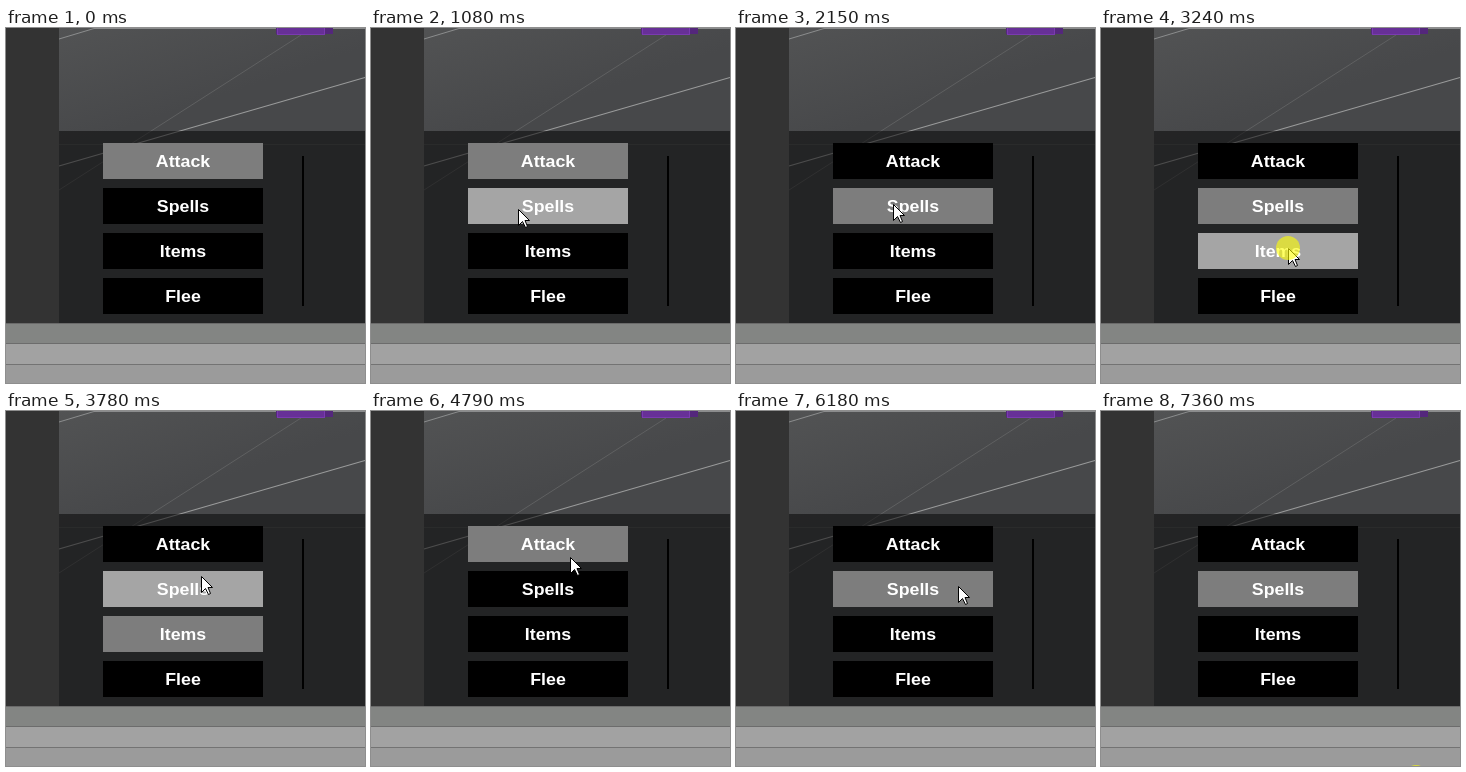
These frames come from a looping animation (359x355 px, 7430 ms). An HTML page with a canvas:

```html
<!DOCTYPE html>
<html lang="en">
<head>
<meta charset="utf-8">
<title>Battle menu</title>
<style>
  html, body { margin: 0; width: 100%; height: 100%; overflow: hidden; background: #333; }
  canvas { display: block; }
</style>
</head>
<body>
<canvas id="stage" width="359" height="355"></canvas>
<script>
const ctx = document.getElementById('stage').getContext('2d');
const LOOP = 7430;
const STEP = 73; // the pointer is sampled at this interval
const LABELS = ['Attack', 'Spells', 'Items', 'Flee'];
const BTN = { x: 97, y: 115, w: 160, h: 36, pitch: 45 };
const UI_ASPECT = 1.11; // the game view is wider than its layout
const PARKED = { x: 339, y: 460 };

// Each move eases from the previous place to x, y
const MOVES = [
  { at: 860, steps: 4, x: 147, y: 181 },
  { at: 1160, steps: 3, x: 146, y: 157 },
  { at: 1690, steps: 3, x: 157, y: 176 },
  { at: 2470, steps: 7, x: 187, y: 220 },
  { at: 3550, steps: 4, x: 195, y: 165 },
  { at: 3850, steps: 3, x: 199, y: 142 },
  { at: 4710, steps: 2, x: 199, y: 146 },
  { at: 5570, steps: 6, x: 222, y: 175 },
  { at: 6490, steps: 1, x: 238, y: 258 },
  { at: 6580, steps: 1, ...PARKED },
  { at: 7360, steps: 1, x: 315, y: 366 }
];

const PRESSES = [
  { from: 2000, to: 2150 },
  { from: 3240, to: 3320 },
  { from: 4320, to: 4390 },
  { from: 5260, to: 5400 },
  { from: 6100, to: 6180 },
  { from: 7360, to: LOOP }
];

const easeOut = u => u * (2 - u);
const buttonTop = i => BTN.y + i * BTN.pitch;

function pointerAt(t) {
  let pos = PARKED;
  for (const { at, steps, x, y } of MOVES) {
    if (t < at) break;
    const done = Math.min(Math.floor((t - at) / STEP) + 1, steps);
    const k = easeOut(done / steps);
    pos = {
      x: Math.round(pos.x + (x - pos.x) * k),
      y: Math.round(pos.y + (y - pos.y) * k)
    };
  }
  return pos;
}

function buttonUnder({ x, y }) {
  if (x < BTN.x || x >= BTN.x + BTN.w) return -1;
  return LABELS.findIndex((_, i) => y >= buttonTop(i) && y < buttonTop(i) + BTN.h);
}

// A button becomes selected when the press on it is released
function selectedAt(t) {
  const last = PRESSES.filter(p => p.to <= t).pop();
  return last ? buttonUnder(pointerAt(last.to)) : 0;
}

function rect(x, y, w, h, color) {
  ctx.fillStyle = color;
  ctx.fillRect(x, y, w, h);
}

function line(color, width, ...pts) {
  ctx.strokeStyle = color;
  ctx.lineWidth = width;
  ctx.beginPath();
  pts.forEach(([x, y]) => ctx.lineTo(x, y));
  ctx.stroke();
}

function drawScene() {
  const floor = ctx.createLinearGradient(53, 0, 90, 110);
  floor.addColorStop(0, '#525354');
  floor.addColorStop(1, '#47484a');
  rect(53, 0, 306, 295, floor);
  line('#8b8c8d', 1, [53, 11], [88, 0.5], [359, 0.5]);
  line('#5f6061', 1, [295, 7], [53, 162]);
  line('#9a9b9b', 1.2, [359, 49.5], [53, 138]);
  line('#555657', 1, [53, 116.5], [359, 116.5]);

  rect(270, 0, 57, 6, '#54277c');
  rect(271, 0, 48, 7, '#673097');
  ctx.strokeStyle = '#7a3bb0';
  ctx.lineWidth = 1;
  ctx.strokeRect(271.5, -1.5, 47, 8);

  rect(53, 103, 306, 192, 'rgba(0, 0, 0, 0.5)');
  rect(296, 128, 2, 150, '#000');
}

function drawFrame() {
  rect(0, 0, 53, 295, '#333');
  rect(0, 295, 359, 1, '#6a6a6a');
  rect(0, 296, 359, 19, '#838583');
  rect(0, 315, 359, 1, '#6c6c6c');
  rect(0, 316, 359, 20, '#a2a2a2');
  rect(0, 336, 359, 1, '#737373');
  rect(0, 337, 359, 18, '#9b9b9b');
}

function drawLabel(label, x, y) {
  ctx.save();
  ctx.translate(x, y);
  ctx.scale(UI_ASPECT, 1);
  ctx.fillStyle = '#fff';
  ctx.fillText(label, 0, 0);
  ctx.restore();
}

function drawMenu(selected, hovered) {
  ctx.font = 'bold 16px "Liberation Sans", Arial, sans-serif';
  ctx.textAlign = 'center';
  LABELS.forEach((label, i) => {
    const y = buttonTop(i);
    const color = i === selected ? '#7d7d7d' : i === hovered ? '#a5a5a5' : '#000';
    rect(BTN.x, y, BTN.w, BTN.h, color);
    drawLabel(label, BTN.x + BTN.w / 2, y + 24);
  });
}

function drawPointer({ x, y }) {
  const arrow = [[0, 0], [0, 16], [4, 12], [7, 18], [9, 17], [6.5, 11], [11, 11]];
  ctx.beginPath();
  arrow.forEach(([dx, dy]) => ctx.lineTo(x + dx + 0.5, y + dy + 0.5));
  ctx.closePath();
  ctx.fillStyle = '#fff';
  ctx.fill();
  ctx.strokeStyle = '#000';
  ctx.lineWidth = 1;
  ctx.stroke();
}

function drawPress({ x, y }) {
  ctx.fillStyle = 'rgba(255, 255, 0, 0.6)';
  ctx.beginPath();
  ctx.arc(x, y, 12, 0, Math.PI * 2);
  ctx.fill();
}

function render(t) {
  const pos = pointerAt(t);
  drawScene();
  drawFrame();
  drawMenu(selectedAt(t), buttonUnder(pos));
  drawPointer(pos);
  if (PRESSES.some(p => t >= p.from && t < p.to)) drawPress(pos);
}

const begin = performance.now();
function tick() {
  render((performance.now() - begin) % LOOP);
  requestAnimationFrame(tick);
}
tick();
</script>
</body>
</html>
```
